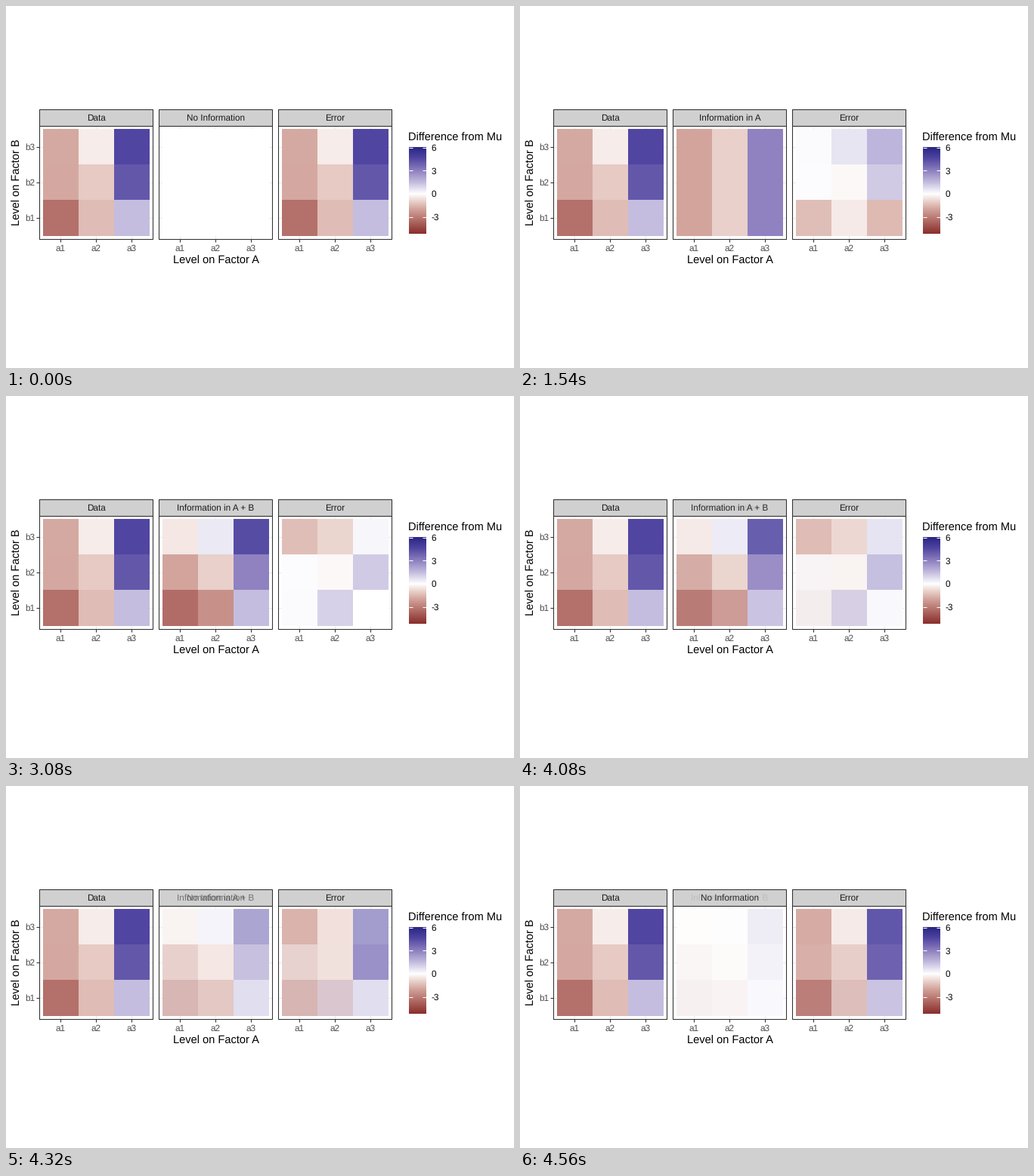
These frames come from a looping animation (672 by 480 pixels, 4.62 s). A matplotlib script:

```python
import numpy as np
import matplotlib.pyplot as plt
from matplotlib.animation import FuncAnimation
from matplotlib.colors import LinearSegmentedColormap
from matplotlib.patches import Rectangle

W, H, DPI = 672, 480, 96
TICK_MS, LOOP_MS = 20, 4620
HOLD_MS, STEP_MS, STEPS = 1000, 60, 10
CYCLE_MS = HOLD_MS + (STEPS - 1) * STEP_MS

plt.rcParams.update({"font.family": "Liberation Sans", "text.hinting": "none"})
SMALL, LARGE = 8.8, 11
LINE = 0.8
DARK, TICK_TEXT, STRIP_TEXT = "#333333", "#4d4d4d", "#1a1a1a"
STRIP_FILL, GRID = "#d0d0d0", "#ebebeb"

# Diverging colour scale over the legend's range
LOW, HIGH = -5.2, 6.1
STOPS = [(-5.2, "#8a2f2c"), (-3.4, "#b4706a"), (-2, "#d2a49c"),
         (-1, "#e9d0ca"), (0, "#ffffff"), (1.5, "#c4bddf"),
         (3, "#9082c0"), (4.7, "#5045a1"), (6.1, "#2a2685")]
CMAP = LinearSegmentedColormap.from_list(
    "diff", [((v - LOW) / (HIGH - LOW), c) for v, c in STOPS], N=1024)


def shade(values):
    return CMAP((np.asarray(values) - LOW) / (HIGH - LOW))[..., :3]


# Rows run b3, b2, b1; columns run a1, a2, a3
data = np.array([[-1.9, -0.4, 4.7], [-1.92, -1.15, 4.2], [-3.4, -1.45, 1.5]])
effect_a = np.array([-2.0, -1.0, 3.0])
effect_b = np.array([[1.5], [0.0], [-1.5]])
models = [np.zeros((3, 3)), np.tile(effect_a, (3, 1)), effect_a + effect_b]
titles = ["No Information", "Information in A", "Information in A + B"]
model_rgb = [shade(m) for m in models]
error_rgb = [shade(data - m) for m in models]

fig = plt.figure(figsize=(W / DPI, H / DPI), dpi=DPI, facecolor="white")
ax = fig.add_axes([0, 0, 1, 1])
ax.axis("off")

PANEL_X = [44, 202, 360]
PANEL_W, STRIP_TOP, TOP, BOTTOM = 150, 137, 159, 309
COLS = [5, 52, 99, 146]
ROWS = [163, 210, 257, 305]
MID_X = [28, 75, 122]
MID_Y = [187, 234, 281]


def line(x0, y0, x1, y1, color, z=1):
    ax.plot([x0, x1], [y0, y1], color=color, lw=LINE, zorder=z,
            solid_capstyle="butt")


def box(x, top, bottom, fill, z):
    ax.add_patch(Rectangle((x, top), PANEL_W, bottom - top, facecolor=fill,
                           edgecolor=DARK, lw=LINE, zorder=z))


def label(x, y, text, color="black", size=SMALL, ha="center", **kw):
    return ax.text(x, y, text, color=color, fontsize=size, ha=ha,
                   va="baseline", zorder=6, **kw)


def make_panel(x):
    for mx in MID_X:
        line(x + mx, TOP, x + mx, BOTTOM, GRID)
        line(x + mx, BOTTOM, x + mx, BOTTOM + 4, DARK)
    for my in MID_Y:
        line(x, my, x + PANEL_W, my, GRID)
    for mx, name in zip(MID_X, ("a1", "a2", "a3")):
        label(x + mx + 0.5, 325, name, TICK_TEXT)
    tiles = []
    for r in range(3):
        for c in range(3):
            tile = Rectangle((x + COLS[c], ROWS[r]), COLS[c + 1] - COLS[c],
                             ROWS[r + 1] - ROWS[r], lw=0, antialiased=False,
                             zorder=2)
            tiles.append(ax.add_patch(tile))
    box(x, TOP, BOTTOM, "none", 4)
    box(x, STRIP_TOP, TOP, STRIP_FILL, 3)
    return tiles


def paint(tiles, rgb):
    for tile, color in zip(tiles, rgb.reshape(-1, 3)):
        tile.set_facecolor(color)


def draw_legend():
    x, top, bottom = 533, 187, 302
    ramp = shade(np.linspace(HIGH, LOW, bottom - top))[:, None, :]
    ax.imshow(ramp, extent=(x, x + 23, bottom, top), aspect="auto",
              interpolation="nearest", zorder=2)
    for value in (6, 3, 0, -3):
        y = 249 - value * 10.17
        line(x, y, x + 4.6, y, "white", 3)
        line(x + 18.4, y, x + 23, y, "white", 3)
        label(562.5, y + 4.2, str(value), ha="left")
    label(532.5, 179, "Difference from Mu", size=LARGE, ha="left")


data_tiles, model_tiles, error_tiles = [make_panel(x) for x in PANEL_X]
paint(data_tiles, shade(data))
for y, name in zip(MID_Y, ("b3", "b2", "b1")):
    line(PANEL_X[0] - 4, y, PANEL_X[0], y, DARK)
    label(38.3, y + 4.2, name, TICK_TEXT, ha="right")
label(277.5, 342, "Level on Factor A", size=LARGE)
label(18.5, 234, "Level on Factor B", size=LARGE, rotation=90,
      rotation_mode="anchor")
label(119.5, 152, "Data", STRIP_TEXT)
label(435.5, 152, "Error", STRIP_TEXT)
model_labels = [label(277.5, 152, t, STRIP_TEXT) for t in titles]
draw_legend()
ax.set_xlim(0, W)
ax.set_ylim(H, 0)


def update(i):
    stage, t = divmod(i * TICK_MS, CYCLE_MS)
    after = (stage + 1) % 3
    # Hold, then cross-fade to the next model in discrete steps
    mix = 0 if t < HOLD_MS else (1 + (t - HOLD_MS) // STEP_MS) / STEPS
    for tiles, rgb in ((model_tiles, model_rgb), (error_tiles, error_rgb)):
        paint(tiles, (1 - mix) * rgb[stage] + mix * rgb[after])
    for k, text in enumerate(model_labels):
        text.set_alpha({stage: 1 - mix, after: mix}.get(k, 0))
    return model_tiles + error_tiles + model_labels


anim = FuncAnimation(fig, update, frames=LOOP_MS // TICK_MS, interval=TICK_MS,
                     repeat=True, cache_frame_data=False)
plt.show()
```
